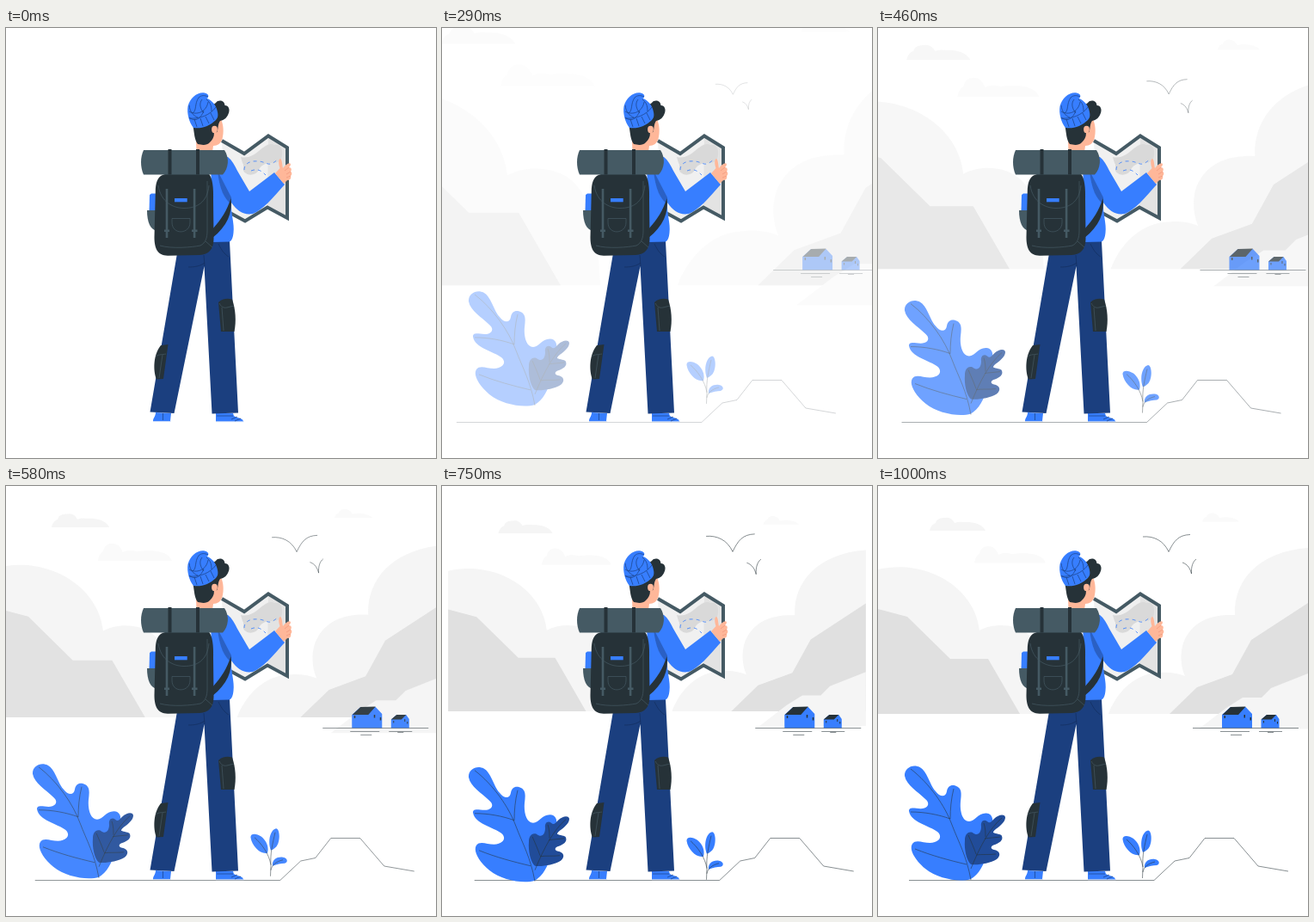
An HTML page that plays this animation: 500 by 500 pixels, repeating every 1.04 s.

```html
<!DOCTYPE html>
<html lang="en">
<head>
<meta charset="utf-8">
<title>Hiker with a map</title>
<style>
  html, body { margin: 0; width: 100%; height: 100%; overflow: hidden; background: #fff; }
  svg { display: block; width: 100vw; height: 100vh; }
  .blue { fill: #377eff; }
  .navy { fill: #1b3f7f; }
  .dark { fill: #263238; }
  .slate { fill: #455a64; }
  .skin { fill: #ffb799; }
  .pale { fill: #f5f5f5; }
  .faint { fill: #fafafa; }
  .grey { fill: #e0e0e0; }
  .ink { fill: none; stroke: #263238; stroke-width: .55; stroke-linejoin: round; }
  .seam { fill: none; stroke: #455a64; stroke-width: .7; }
  .fold { fill: none; stroke: #1b3f7f; stroke-width: .7; }
</style>
</head>
<body>
<svg viewBox="0 0 500 500">
  <g id="scenery">
    <path class="pale" d="M60 52C61 47 64 44 67 43C68 38 73 37 78 37C83 36 87 39 89 43C94 41 98 42 103 42C111 42 121 44 125 52Z"/>
    <g class="faint">
      <path d="M112 89.500C113 84 115 80 118 79C119 73 123 70 128 70C134 70 138 74 140 80C145 77 151 78 156 79C167 78 190 76 195 89.500Z"/>
      <path d="M377 41.500C378 38 380 36 382 36C383 32 387 31 390 31.500C393 32 396 34 397 37C404 35 417 37 420 41.500Z"/>
    </g>
    <g class="pale">
      <path d="M0 97C56 84 113 118 118 168C134 159 160 160 174 172C192 186 198 220 200 265H0Z"/>
      <path d="M268 265C276 243 297 217 328 217C340 216 349 218 357 221C350 205 352 186 358 176C369 156 389 149 415 150C413 111 442 76 500 72V265Z"/>
    </g>
    <g class="grey">
      <path d="M0 143L34 152L84 201H128L165 265H0Z"/>
      <path d="M500 136L434 179L412 219L371 234L339 265H500Z"/>
    </g>
    <path class="pale" d="M373 282.500L405 258L424 246H446L457 235L500 218V282.500Z"/>
  </g>

  <g id="houses">
    <path class="blue" d="M400 266L410 257H427.500L435 265V281.500H400ZM445.500 271.500L452 266H463L466.500 271V281.500H445.500Z"/>
    <path class="dark" d="M400.500 266L410 257L427.500 256.500L419 266ZM445.500 271.500L452 266H463L457.500 271.500Z"/>
    <path class="dark" d="M402.500 267H404V270H402.500ZM425.500 266H427V269.500H425.500ZM432.500 269H434V272.500H432.500ZM448 273H449V275.500H448ZM461 271H462V274H461ZM464 274H465V276.500H464Z"/>
    <path class="ink" d="M366 281.500H489M398 285.500H432M443 285.500H470M410 289.500H423M453 286.500H460"/>
  </g>

  <path id="birds" class="ink" d="M308 59C320 58 332 63 338 76.500C344 64 349 57 363 56.500M354 89C360 91 363 96 364.500 102C364 94 366 88 370 85"/>

  <path id="ground" class="ink" d="M36 458.500H321L345 436L362 432.500L380 409.500H414L442 442L477 448"/>

  <g id="plants">
    <path class="blue" d="M31 337C30 326 46 320 54 332C60 341 62 350 67 355C72 362 79 362 80 355C81 349 85 347 90 348.500C98 351 97 358 96 367C95 378 98 390 106 390C113 390 116 380 126 380.500C134 381 135 390 131 398C128 405 130 412 127 425C124 440 117 452 108 457C95 461 70 457 55 445C42 434 36 422 40 416C45 409 57 418 66 414C73 412 74 406 69 402C60 395 38 391 36 378C36 371 47 377 54 374.500C59 373 60 368 55 364C46 355 33 348 31 337Z"/>
    <path class="ink" d="M38 329C60 346 78 372 86 394C94 415 103 430 108 458M38 379C54 379 70 382 84 387M88 352C85 364 84 376 84 387M43 422C63 430 82 435 103 440"/>
    <path fill="#214c99" d="M148 385C147 381 140 382 135 387C132 390 130 393 127 390C123 387 119 390 120 396C120 403 116 408 110 403C104 401 101 406 101 412C100 422 103 436 108 440C116 441 130 439 138 434C144 429 141 424 135 423C130 422 131 418 136 417C141 415 146 412 144 407C143 404 137 405 134 403C134 399 148 394 148 385Z"/>
    <path class="ink" d="M144 386C130 398 119 418 108 445M123 392C125 398 125 403 125 408M142 408C135 409 130 409 124 410M105 406C109 415 112 422 114 428M137 428C129 429 121 428 114 429"/>
    <path class="blue" d="M304 429C296 431 286 421 284.500 411C284 406 291 406 297 410C303 415 306 422 304 429ZM308 426C304 416 307 402 314 400.500C319 401 319 417 314 422C312 424 310 425 308 426ZM310 444C309 437 315 433 322 434C328 435 328 440 324 441C320 441 315 442 310 444Z"/>
    <path class="ink" d="M289 411C297 418 306 430 308 443M313 405C310 418 307 430 308 443L307.500 456M322 437C314 439 309 443 308 449"/>
  </g>

  <g id="hiker">
    <path d="M251 131L277 146L305 125.500L327 139V221L304 208.500L278 224.500L255 212Z" fill="#f0f0f0"/>
    <path class="grey" d="M305 126L327 139V221L304 208.500Z" opacity=".8"/>
    <path d="M273 150C281 152 288 148 294 143C301 137 307 133 312 136C318 135 322 139 321 147C321 155 315 158 308 157C301 157 296 160 294 165C291 171 283 172 279 169C273 166 278 160 275 157Z" fill="#d9d9d9"/>
    <path d="M277 165C277 157 285 154 293 155C300 155 303 159 308 158C312 157 313 154 316 154M285 166C293 163 297 166 302 171" fill="none" stroke="#377eff" stroke-width=".8" stroke-dasharray="4 4"/>
    <path d="M251 131L277 146L305 125.500L327 139V221L304 208.500L278 224.500L255 212" fill="none" stroke="#455a64" stroke-width="4"/>

    <path class="blue" d="M174 447L192 448L191 457H171C171 453 174 452 174 447ZM244 448H264L265 451C269 454 276 453 276 458H244Z"/>
    <path d="M171 457.500H191.500M244 457.700H276.500" stroke="#c7d9fa" fill="none"/>
    <path class="fold" d="M182.500 448V456M245 451H264M262 455L269 452M266 457L273 454"/>
    <path class="navy" d="M199 262L167.500 446.500L195.500 448L230.500 277L239.500 448.500L270 447.500L260 248H240Z"/>
    <path class="fold" style="stroke:#142e5d" d="M231 277L230 264M212 278C219 278 226 277 231 273M247 251C251 259 254 263 259 266"/>
    <path class="dark" d="M180 369L188.500 368L183 408L175 408.500C171 399 171 380 180 369ZM247 319C251 315 257 314 263 315.500C267 327 268 341 265.500 353H250Z"/>
    <path class="seam" d="M174 382C178 379 182 380 186 379M182 380L178 407M248 320C250 324 253 326 257 325L265 323M251 325L253 352"/>

    <path class="blue" d="M238 150H258C263 154 266 160 269 166L283 190L312 168L324 182C311 197 298 212 287 216C277 218 269 213 262 203C261 214 266 228 264.500 238C264 243 263 247 260 248.500L240 249Z"/>
    <path d="M246 166L262 197V205C254 199 248 187 246 166Z" fill="#2a60c4"/>
    <path class="dark" d="M261.500 198C264 214 257 231 240 244V234C250 223 257 212 261.500 198Z"/>
    <path class="skin" d="M313 169L318.500 163C316.500 157 317 152 319 152C321 153 321 158 322 163C325 159 329 156 331 158C331 160 330 161 329 162C332 162 332.500 165 331 167C333 168 332.500 171 331 172C332 175 330 177 327 177L323 181Z"/>
    <path d="M329 162L324 166M331 167L326 170M331 172L326 174" fill="none" stroke="#ed8f74" stroke-width=".6"/>

    <path class="skin" d="M221 132L221.500 144H240L241 137C246 137 250 134 251.500 129C253.500 121 253 113 250 106L238 111Z"/>
    <path class="dark" d="M217.500 114C219 122 219 130 223 135C228 136 233 137 237 133C240 130 242 127 242 122L245.500 121C247 117 246 112 249 108C254 107 257 104 258.500 100C261 95 259 90 254.500 90C254 84 247 83 244 87L231 96Z"/>
    <ellipse class="skin" cx="242.500" cy="118" rx="3.400" ry="4.200"/>
    <path class="blue" d="M218 116C213 110 210 99 211.500 91C214 81 223 74 231 75.500C236 76.500 236.500 80 233.500 82C238 83 243 88 245 94C247 100 247 104 244 107C237 114 227 117.500 218 116Z"/>
    <path class="fold" d="M213 105C225 106 238 101 244 92M213 97C221 102 233 98 235 86M217 99C222 96 219 88 224 81C227 78 231 78 235 80M213 90C214 98 218 102 223 104M228 83C224 88 226 94 230 99M233 83C238 87 239 91 239 97M219 106L222 115M226 105L229 114M232 103L236 111M238 99L242 107M213 104C219 109 226 107 230 96"/>

    <path class="blue" d="M167 194L169 192.500H175V213H166.500Z"/>
    <path class="slate" d="M164 212H176V236C168 235 164 226 164 212Z"/>
    <path class="dark" d="M180 172C187 167 225 166 236 170C240 174 241.500 185 241 200L241.500 245C241.500 257 236 263.500 225 264L188 264.700C176 264.500 172.500 256 172.500 243L173.800 190C174 180 176 175 180 172Z"/>
    <path class="seam" d="M177 183C180 203 195 209.500 207 209.500C222 209.500 234 203 236 183M193 221.500H214V226C214 240 193 241 193 226ZM179 253C193 257 216 255 226 253C232 250 234 244 234 236V178M232 248L240 255"/>
    <path class="slate" d="M185.700 187H188.300V244H185.700ZM217.800 187H220.400V244H217.800ZM184 234.500H190V237H184ZM216 234.500H222.500V237H216Z"/>
    <rect class="blue" x="196" y="198" width="14.700" height="4.300"/>
    <path class="slate" d="M160 142H254C260 151 259 163 252 170.500H160C156 162 156 150 160 142Z"/>
    <path class="dark" d="M188.500 141H192.500V170.500H188.500ZM221 141H225V170.500H221Z"/>
  </g>
</svg>
<script>
  const LOOP = 1040, FPS = 24;
  const $ = id => document.getElementById(id);
  const bez = (u, a, b) => 3 * a * u * (1 - u) ** 2 + 3 * b * u * u * (1 - u) + u ** 3;

  // cubic-bezier(.36, -.01, .5, 1.38)
  function ease(x) {
    if (x >= 1) return 1;
    let lo = 0, hi = 1;
    for (let i = 0; i < 30; i++) {
      const mid = (lo + hi) / 2;
      if (bez(mid, .36, .5) < x) lo = mid; else hi = mid;
    }
    return bez(lo, -.01, 1.38);
  }

  const zoom = (cx, cy, s) => `translate(${cx} ${cy}) scale(${s}) translate(${-cx} ${-cy})`;
  const slide = (dx, dy) => r => `translate(${dx * r} ${dy * r})`;

  // Each pose takes the part of the move still to go.
  const parts = {
    scenery: r => zoom(250, 157.5, 1 + r / 2),
    houses: slide(30, 0),
    birds: r => zoom(339, 79, 1 - r / 2),
    ground: slide(-30, 0),
    plants: slide(0, -30)
  };

  // Steps start on whole hundredths of a second.
  function stepAt(t) {
    let k = 0;
    while (Math.round((k + 1) * 100 / FPS) * 10 <= t) k++;
    return Math.min(k, 24);
  }

  function draw(t) {
    const k = stepAt(t);
    const p = k < 3 ? 0 : ease(k / FPS + .028);
    for (const id in parts) {
      const el = $(id);
      el.setAttribute("transform", parts[id](1 - p));
      el.setAttribute("opacity", Math.min(1, p));
    }
  }

  const start = performance.now();
  function tick() {
    draw((performance.now() - start) % LOOP);
    requestAnimationFrame(tick);
  }
  draw(0);
  requestAnimationFrame(tick);
</script>
</body>
</html>
```
